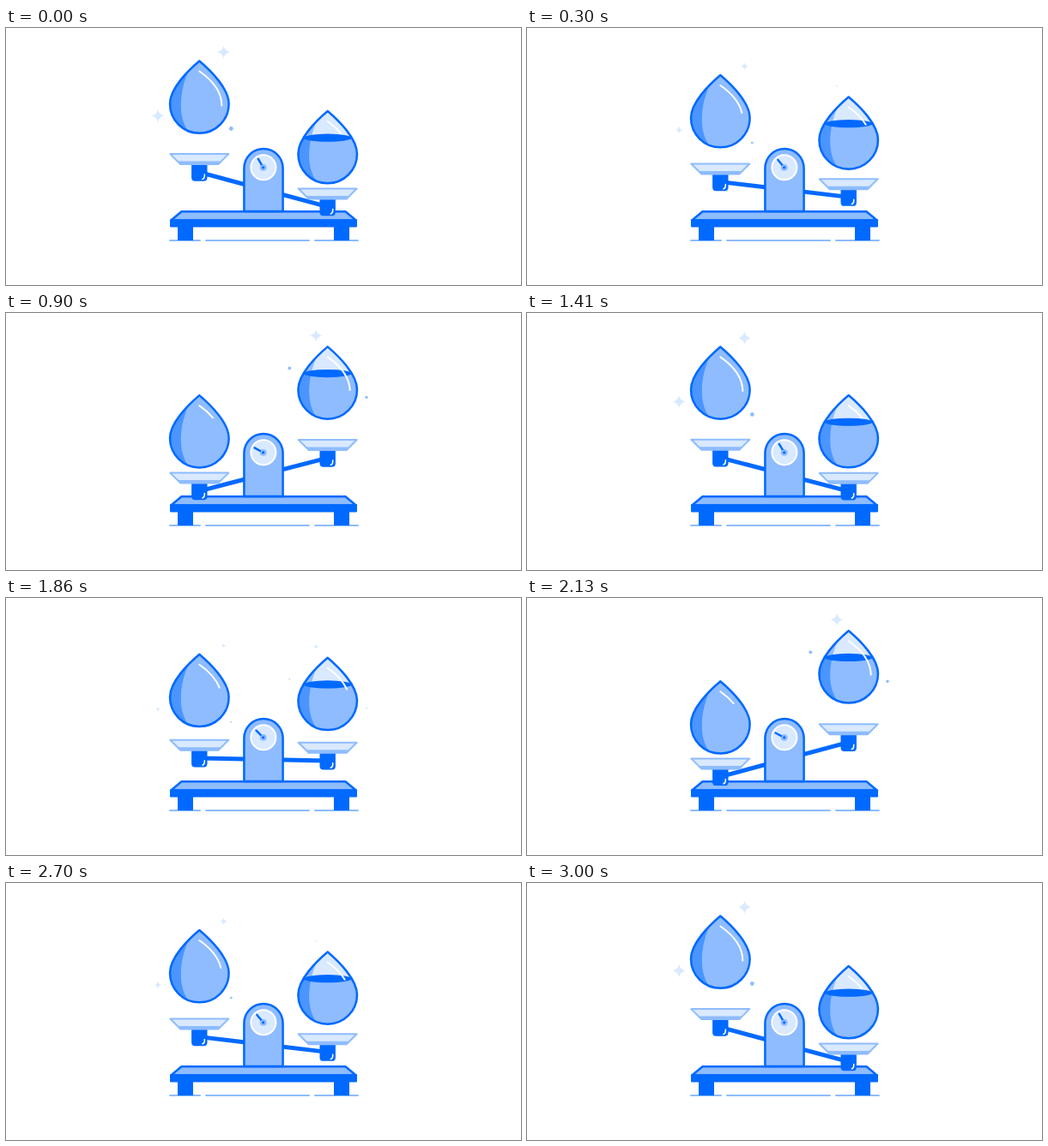
An HTML page that plays this animation: 600x300 px, repeating every 3.03 s.

```html
<!DOCTYPE html>
<html lang="en">
<head>
<meta charset="utf-8">
<title>Balance</title>
<style>
html, body { margin: 0; width: 100%; height: 100%; overflow: hidden; background: #fff; }
svg { display: block; width: 600px; height: 300px; }
.blue { fill: #0069ff; }
.mid { fill: #8ebcff; }
.pale { fill: #d9e9ff; }
.edge { stroke: #0069ff; stroke-width: 2.5; stroke-linejoin: round; }
.shine { fill: none; stroke: #fff; stroke-width: 2; stroke-linecap: round; }
</style>
</head>
<body>
<svg viewBox="0 0 600 300">
  <defs>
    <path id="drop" d="M0 0C13 11 34.3 32 34.3 50A34.3 34.3 0 0 1 -34.3 50C-34.3 32 -13 11 0 0Z"/>
    <path id="shade" d="M-10 6C-18 22 -21.5 37 -21.5 52C-21.5 65 -18 76 -11 85H-40V6Z"/>
    <path id="star" d="M0 -7.5Q1.4 -1.4 7.5 0Q1.4 1.4 0 7.5Q-1.4 1.4 -7.5 0Q-1.4 -1.4 0 -7.5Z"/>
    <clipPath id="inside"><use href="#drop"/></clipPath>
    <clipPath id="under"><rect x="-40" y="31" width="80" height="60"/></clipPath>
    <g id="pan">
      <path class="blue" d="M-9.2 12H9.2V27.5Q9.2 31.7 5 31.7H-5Q-9.2 31.7 -9.2 27.5Z"/>
      <path class="shine" style="stroke-width:1.5" d="M6 24V25.5Q6 28.8 3.6 29.4"/>
      <path class="pale" d="M-34 0H34L22 12H-22Z"/>
      <path class="mid" d="M-26 8.5H26L22 12H-22Z"/>
      <path d="M-34 0H34L22 12H-22Z" fill="none" stroke="#8ebcff" stroke-width="2" stroke-linejoin="round"/>
    </g>
  </defs>

  <path d="M191 248H226M233 248H353M360 248H410" stroke="#8ebcff" stroke-width="2" stroke-linecap="round"/>
  <path class="blue" d="M200 230H218V248H200ZM382 230H400V248H382Z"/>
  <path class="mid edge" d="M192.2 224.5L204.5 214.2H395.5L407.8 224.5Z"/>
  <rect class="blue" x="191" y="223.3" width="218" height="9.3" rx="1"/>

  <line id="beam" x1="225.3" x2="374.7" stroke="#0069ff" stroke-width="5"/>
  <path class="mid edge" d="M277.4 214V163.5A22.6 22.6 0 0 1 322.6 163.5V214Z"/>
  <circle class="pale" cx="299.9" cy="162.8" r="14.5" stroke="#fff" stroke-width="2"/>
  <g transform="translate(299.7 162.8)">
    <circle class="mid" r="3.9"/>
    <line id="needle" y2="-11.5" stroke="#0069ff" stroke-width="2.5" stroke-linecap="round"/>
    <circle class="mid" r="3.2"/>
    <circle class="blue" r="1.6"/>
  </g>

  <use id="panL" href="#pan"/>
  <use id="panR" href="#pan"/>

  <g id="dropL">
    <use href="#drop" class="mid"/>
    <use href="#shade" fill="#4a95ff" clip-path="url(#inside)"/>
    <path id="shineL" class="shine" pathLength="1" d="M0 12C13 21 26 35 26 52"/>
    <use href="#drop" class="edge" fill="none"/>
    <g id="sparkL"></g>
  </g>
  <g id="dropR">
    <use href="#drop" class="pale"/>
    <g clip-path="url(#inside)">
      <use href="#shade" class="mid"/>
      <g clip-path="url(#under)">
        <use href="#drop" class="mid"/>
        <use href="#shade" fill="#4a95ff"/>
      </g>
      <ellipse class="blue" cy="31.2" rx="28" ry="4.6"/>
    </g>
    <path id="shineR" class="shine" pathLength="1" d="M0 12C13 21 26 35 26 52"/>
    <use href="#drop" class="edge" fill="none"/>
    <g id="sparkR"></g>
  </g>
</svg>
<script>
const $ = id => document.getElementById(id);
const STEP = 30, FRAMES = 101, SWING = 750;
const LEFT = 225.3, RIGHT = 374.7;

const star = (x, y) => ({ x, y, art: '<use href="#star" class="pale"/>' });
const dot = (x, y, r) => ({ x, y, art: `<circle class="mid" r="${r}"/>` });
const sparks = {
  sparkL: [star(28.2, -10.3), star(-48.2, 64), dot(37, 79, 2.4)],
  sparkR: [star(-13.7, -13), dot(-44.4, 25, 2), dot(45.3, 59, 1.8)]
};
for (const id in sparks)
  $(id).innerHTML = sparks[id].map(s => `<g transform="translate(${s.x} ${s.y})"><g class="s">${s.art}</g></g>`).join('');

// cubic-bezier(.6, 0, .4, 1)
function ease(x) {
  let lo = 0, hi = 1, s;
  for (let i = 0; i < 24; i++) {
    s = (lo + hi) / 2;
    if (1.8 * s * (1 - s) ** 2 + 1.2 * s * s * (1 - s) + s ** 3 < x) lo = s; else hi = s;
  }
  return s * s * (3 - 2 * s);
}

const move = (id, x, y) => $(id).setAttribute('transform', `translate(${x} ${y})`);
const trim = (id, part) => $(id).setAttribute('stroke-dasharray', `${part} 2`);
const scale = (id, k) => $(id).querySelectorAll('.s').forEach(g => g.setAttribute('transform', `scale(${k})`));

function draw(now) {
  const t = Math.floor(now / STEP) % FRAMES * STEP;
  const x = t % (2 * SWING) / SWING;
  const p = ease(x < 1 ? x : 2 - x);
  const tilt = 20.2 - 41.5 * p;

  move('panL', LEFT, 167.3 - tilt);
  move('panR', RIGHT, 167.3 + tilt);
  $('beam').setAttribute('y1', 188.5 - tilt);
  $('beam').setAttribute('y2', 188.5 + tilt);
  $('needle').setAttribute('transform', `rotate(${-30.5 - 33 * p})`);

  move('dropL', LEFT, 38.5 + 60.5 * p);
  move('dropR', RIGHT, 97 - 60.5 * p);
  trim('shineL', 1 - 0.6 * p);
  trim('shineR', 0.42 + 0.58 * p);
  scale('sparkL', (1 - p) ** 1.8);
  scale('sparkR', p ** 1.3);
}

function loop() {
  draw(performance.now());
  requestAnimationFrame(loop);
}
loop();
</script>
</body>
</html>
```
